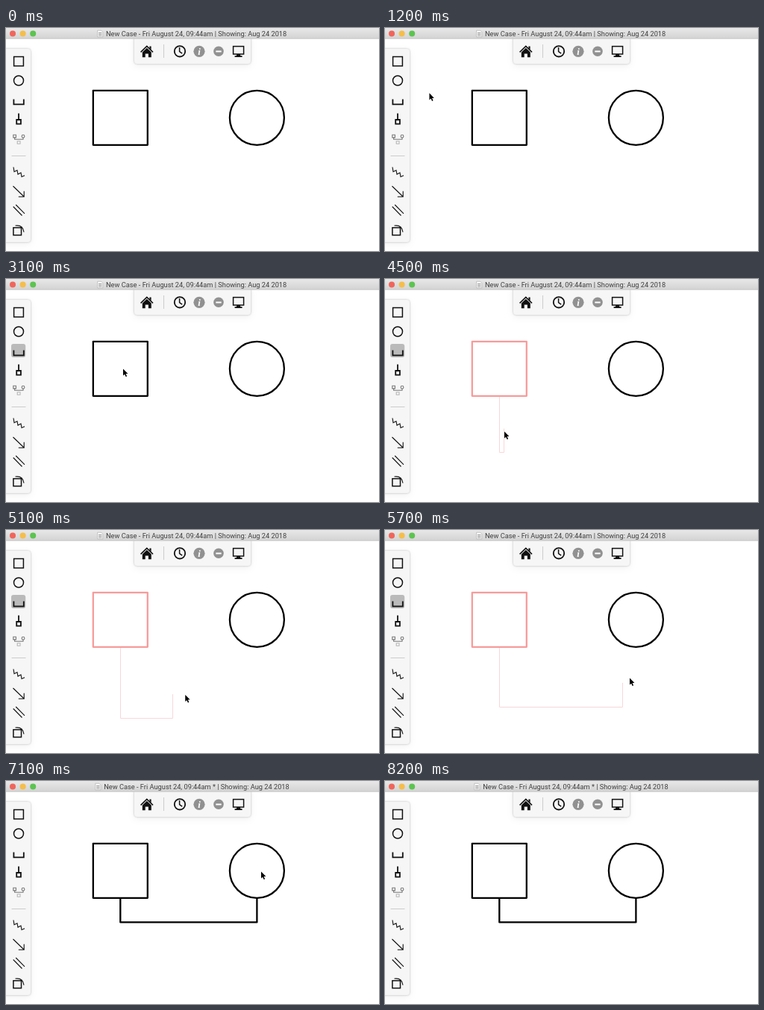
An HTML page that plays this animation: 500 by 299 pixels, repeating every 8900 ms.

```html
<!DOCTYPE html>
<html lang="en">
<head>
<meta charset="utf-8">
<title>Drawing a relationship</title>
<style>
  html, body { margin: 0; width: 100%; height: 100%; overflow: hidden; background: #fff; }
  svg { display: block; width: 100vw; height: 100vh; }
  .icon { fill: none; stroke: #111; stroke-width: 1.5; }
  .thin { stroke-width: 1.1; }
  .bold { stroke-width: 1.8; }
  .pale { stroke: #777; }
  .panel { fill: #f6f6f6; filter: drop-shadow(0 .5px 1.5px rgba(0,0,0,.26)) drop-shadow(0 3px 5px rgba(0,0,0,.05)); }
  .rule { stroke: #ccc; }
  .shape { fill: none; stroke: #000; stroke-width: 2.3; stroke-linejoin: round; }
  .shape.hot { stroke: #f79b9b; }
  .drag { fill: none; stroke: #fad6d8; }
  .title { font: 9.25px Roboto, Arial, sans-serif; fill: #404040; }
</style>
</head>
<body>
<svg viewBox="0 0 500 299" preserveAspectRatio="none">
  <defs>
    <linearGradient id="bar" x2="0" y2="1">
      <stop offset="0" stop-color="#e8e8e8"/>
      <stop offset="1" stop-color="#d3d3d3"/>
    </linearGradient>
  </defs>

  <!-- top toolbar -->
  <path class="panel" d="M172 10H328V44a4 4 0 0 1-4 4H176a4 4 0 0 1-4-4Z"/>
  <path class="icon" d="M180.6 32.4 188.8 24.4 197 32.4"/>
  <path d="M182.8 32.6 188.8 26.8 194.8 32.6V39.2H190.9V34.4H186.7V39.2H182.8ZM192.4 24.4H194.6V29L192.4 27Z" fill="#111"/>
  <path class="rule" d="M211.5 22V40"/>
  <circle class="icon bold" cx="233" cy="31.3" r="7.2"/>
  <path class="icon" d="M232.6 26V31.6L236.2 34.2"/>
  <circle cx="259" cy="31.3" r="7.6" fill="#919191"/>
  <text x="259" y="35.6" text-anchor="middle" fill="#fff" font-family="Liberation Serif, serif" font-size="13" font-style="italic" font-weight="700">i</text>
  <circle cx="285" cy="31.3" r="6.8" fill="#919191"/>
  <path d="M281.3 31.4H288.7" stroke="#fff" stroke-width="2"/>
  <rect class="icon" x="304.6" y="24.6" width="14" height="10.4"/>
  <path d="M309.5 35H313.7L314.4 37.3H316.6V39H306.6V37.3H308.8Z" fill="#111"/>

  <!-- side toolbar -->
  <path class="panel" d="M-4 28H29a4 4 0 0 1 4 4V283a4 4 0 0 1-4 4H-4Z"/>
  <rect id="pick" x="7" y="87" width="19.2" height="18" rx="3" fill="#bababa"/>
  <rect class="icon" x="10.6" y="38.5" width="12.8" height="12.4"/>
  <circle class="icon" cx="17" cy="70.5" r="6.5"/>
  <path class="icon bold" d="M10.4 95.5V102.3H23.8V95.5"/>
  <path class="icon bold" d="M17 114.5V123M14.2 123H19.9V128.7H14.2Z"/>
  <path class="icon thin pale" d="M9.8 143.3H13.4V146.9H9.8ZM11.6 147V149.2H23V147.2"/>
  <circle class="icon thin pale" cx="23" cy="145.2" r="1.9"/>
  <path class="icon thin pale" opacity=".5" d="M15.2 151.8H19V155.2H15.2Z"/>
  <path class="rule" d="M7.5 171.5H26.5"/>
  <path class="icon thin" d="M10 186.5l1 6.2 4-2 1 5.4 4-2 1 5.4 4-1.8"/>
  <path class="icon thin" d="M9.5 212 24 226M24.2 218.8V226.2H16.8"/>
  <path class="icon thin" d="M9.7 239.5 21.5 251.5M13.2 237 25 248.8"/>
  <rect class="icon" x="9.9" y="267.7" width="10.6" height="10"/>
  <path class="icon thin" d="M12.5 265Q22.6 263.6 24 273.6"/>

  <!-- canvas -->
  <rect class="shape" id="box" x="116.8" y="83.8" width="73" height="73"/>
  <circle class="shape" id="ring" cx="336.4" cy="120.3" r="36.5"/>
  <path class="shape" id="link" d="M153.3 157V189.4H336.4V157"/>
  <path class="drag" id="drag"/>

  <!-- title bar -->
  <rect width="500" height="14.4" fill="url(#bar)"/>
  <path d="M0 14.2H500" stroke="#b8b8b8" stroke-width=".6"/>
  <circle cx="9" cy="7.4" r="4" fill="#f0655b"/>
  <circle cx="22.6" cy="7.4" r="4" fill="#f5be4b"/>
  <circle cx="36.2" cy="7.4" r="4" fill="#5cc450"/>
  <g id="head">
    <path d="M122.6 3.2H127.6L129.8 5.4V12H122.6Z" fill="#f7f7f7" stroke="#aaa" stroke-width=".6"/>
    <path d="M124 6.5h4.4M124 8.3h4.4M124 10.1h4.4" stroke="#888" stroke-width=".8"/>
    <text class="title" id="title" x="134" y="10.6"></text>
  </g>

  <path id="cursor" d="M0 0V9.2L2.1 7.3 3.6 10.7 5.1 10 3.6 6.7H6.4Z" fill="#000" stroke="#fff" stroke-width=".7" paint-order="stroke"/>
</svg>
<script>
  const LOOP = 8900, STEP = 100;
  const $ = id => document.getElementById(id);

  // Pointer moves, each starting where the last one ended.
  // "via" holds cubic control points; without it the move eases in and out.
  const home = [72, 306];
  const moves = [
    { from: 400, end: 1300, to: [59, 79] },
    { from: 1300, end: 1900, to: [16, 100] },
    { from: 2300, end: 3100, to: [157, 120] },
    { from: 3900, end: 4500, to: [160, 204], via: [[157, 120], [160, 212]] },
    { from: 4500, end: 5700, to: [328, 198], via: [[184, 226], [294, 228]] },
    { from: 5700, end: 6400, to: [342, 121], via: [[338, 180], [343, 128]] },
    { from: 8000, end: 8200, to: [331, 195] }
  ];

  function bezier(a, b, c, d, k) {
    const m = 1 - k;
    return a.map((_, i) => m * m * m * a[i] + 3 * m * m * k * b[i] + 3 * m * k * k * c[i] + k * k * k * d[i]);
  }

  function pointer(t) {
    let at = home;
    for (const { from, end, to, via = [at, to] } of moves) {
      if (t < from) break;
      const k = Math.min(1, (t - from) / (end - from));
      at = bezier(at, ...via, to, k);
    }
    return at;
  }

  const show = (id, on) => { $(id).style.display = on ? "" : "none"; };
  const half = v => Math.floor(v) + 0.5;

  function draw(t) {
    const [x, y] = pointer(t);
    const during = (a, b) => t >= a && t < b;

    show("cursor", during(500, 8200));
    $("cursor").setAttribute("transform", `translate(${x} ${y + 0.4})`);
    show("pick", during(1700, 7000));
    show("link", t >= 7000);

    const overRing = Math.hypot(x - 336.4, y - 120.3) < 37;
    $("box").classList.toggle("hot", during(3500, 7000));
    $("ring").classList.toggle("hot", during(5800, 7000) && overRing);

    // the rubber line trails the pointer by one step
    const dragging = during(4000, 7000);
    show("drag", dragging);
    if (dragging) {
      const [ex, ey] = pointer(Math.min(t, 6400) - STEP);
      const low = half(Math.max(157, ey) + 32.4);
      $("drag").setAttribute("d", `M153.5 158V${low}H${half(ex)}V${ey}`);
    }

    const edited = t >= 7100;
    $("title").textContent = `New Case - Fri August 24, 09:44am${edited ? " *" : ""} | Showing: Aug 24 2018`;
    $("head").setAttribute("transform", `translate(${edited ? -2.8 : 0} 0)`);
  }

  const start = performance.now();
  function tick() {
    const t = (performance.now() - start) % LOOP;
    draw(Math.floor(t / STEP) * STEP);
    requestAnimationFrame(tick);
  }
  tick();
</script>
</body>
</html>
```
